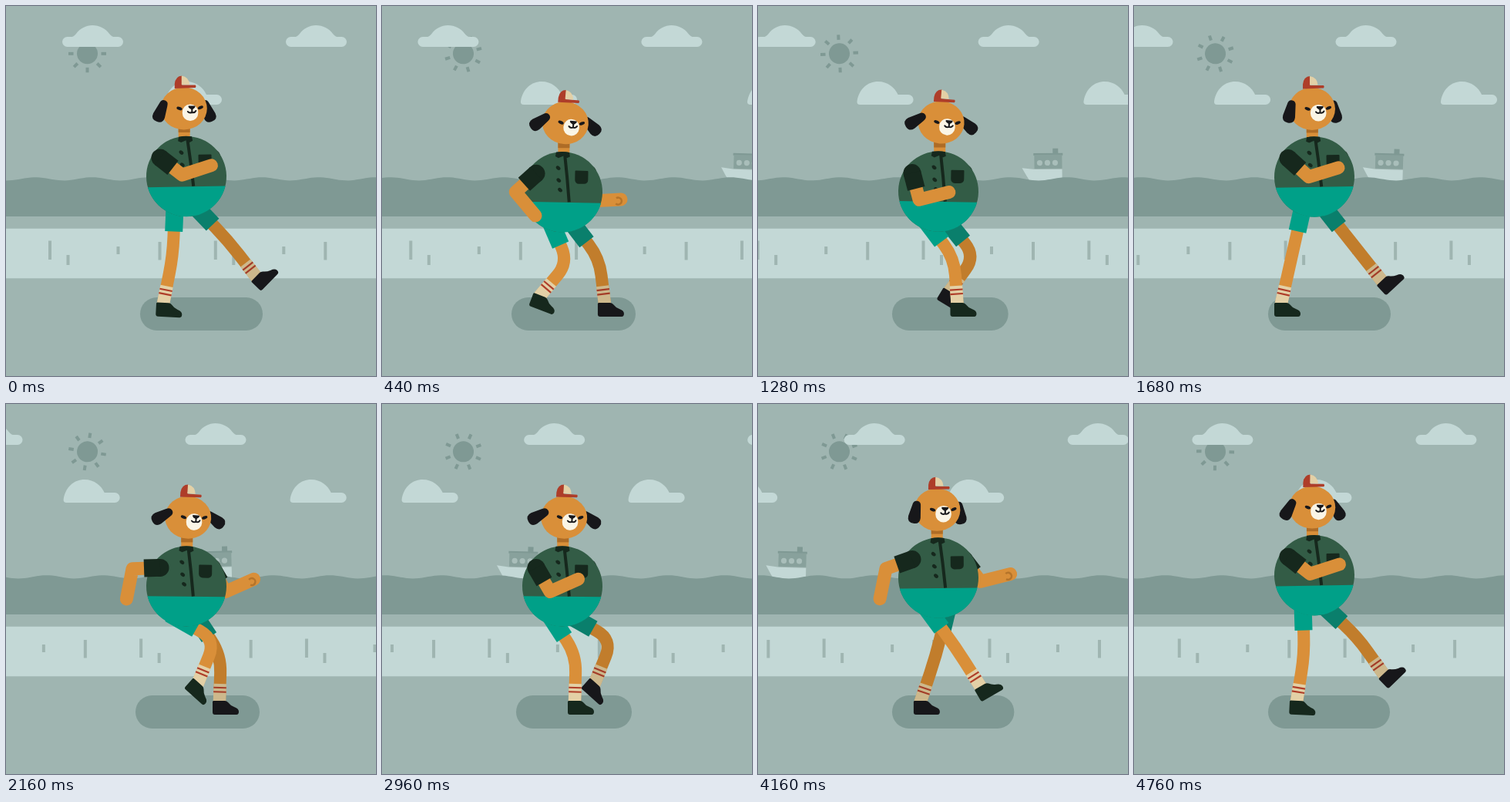
Recreate the animation shown at these times as an HTML page with a canvas. Size 480 by 480 pixels, loop 4.8 s.

```html
<!DOCTYPE html>
<html lang="en">
<head>
<meta charset="utf-8">
<title>Dog on a seaside walk</title>
<style>
html, body { margin: 0; width: 100%; height: 100%; overflow: hidden; background: #9fb5b1; }
canvas { display: block; width: 480px; height: 480px; }
</style>
</head>
<body>
<canvas id="stage" width="480" height="480"></canvas>
<script>
const ctx = document.getElementById('stage').getContext('2d');
const LOOP = 4800, STRIDE = 1600, TICK = 40, TAU = Math.PI * 2;
const C = {
  sky: '#9fb5b1', sea: '#7f9994', pale: '#c3d8d6', window: '#a9beba',
  skin: '#d98f39', shade: '#ae6c26', shirt: '#335c46', dark: '#16281d',
  pants: '#00a088', red: '#ae3d29', cream: '#e3d0a6', ink: '#17171a', white: '#faf5e6'
};
const NEAR = { skin: C.skin, pants: C.pants, sock: C.cream, stripe: C.red, shoe: C.dark };
const FAR = { skin: '#c17d2c', pants: '#0a7f6c', sock: '#cdb88c', stripe: '#a33c28', shoe: C.ink };
const rad = d => d * Math.PI / 180;

// Periodic monotone curve through [phase, value] keys.
function track(keys) {
  const n = keys.length;
  const at = i => {
    const k = Math.floor(i / n), [q, v] = keys[i - k * n];
    return [q + k * STRIDE, v];
  };
  const slope = i => {
    const [a, b] = [at(i), at(i + 1)];
    return (b[1] - a[1]) / (b[0] - a[0]);
  };
  const tangent = i => {
    const a = slope(i - 1), b = slope(i);
    return a * b <= 0 ? 0 : 2 * a * b / (a + b);
  };
  return phase => {
    const q = ((phase % STRIDE) + STRIDE) % STRIDE;
    let i = n - 1;
    while (i > 0 && keys[i][0] > q) i--;
    const [q0, v0] = at(i), [q1, v1] = at(i + 1);
    const h = q1 - q0, u = (q - q0) / h, w = 1 - u;
    return v0 * (1 + 2 * u) * w * w + tangent(i) * h * u * w * w
      + v1 * u * u * (3 - 2 * u) - tangent(i + 1) * h * u * u * w;
  };
}

const footX = track([[0, 204], [80, 191], [320, 176], [560, 249], [780, 298], [880, 295], [1120, 272], [1360, 250], [1560, 211]]);
const footY = track([[0, 386], [320, 386], [560, 362], [770, 351], [880, 357], [1120, 386]]);
const footTilt = track([[0, 3], [80, 0], [320, 0], [560, 42], [780, -46], [880, -43], [1120, 0], [1360, 0]]);
const kneeBend = track([[0, 5], [80, 0], [320, 15], [560, 40], [760, 6], [880, 0], [1120, 11], [1360, 18], [1560, 6]]);
const upperAngle = track([[0, 38], [80, 42], [320, 90], [560, 178], [720, 190], [880, 175], [1360, 60], [1560, 38]]);
const foreAngle = track([[0, -18], [80, -17], [320, 0], [560, 101], [720, 115], [880, 113], [1360, -24], [1560, -18]]);
const shadowLeft = track([[0, 174], [80, 174], [320, 168], [560, 168], [880, 174], [1360, 174]]);
const shadowRight = track([[0, 333], [80, 333], [320, 329], [560, 329], [880, 333], [1360, 324], [1560, 332]]);

function rect(color, x, y, w, h, r = 0) {
  ctx.fillStyle = color;
  ctx.beginPath();
  ctx.roundRect(x, y, w, h, r);
  ctx.fill();
}
function oval(color, x, y, rx, ry = rx, turn = 0) {
  ctx.fillStyle = color;
  ctx.beginPath();
  ctx.ellipse(x, y, rx, ry, rad(turn), 0, TAU);
  ctx.fill();
}
function shape(color, d) {
  ctx.fillStyle = color;
  ctx.fill(new Path2D(d));
}
function curve(color, width, d, cap = 'butt') {
  ctx.strokeStyle = color;
  ctx.lineWidth = width;
  ctx.lineCap = cap;
  ctx.lineJoin = 'round';
  ctx.stroke(new Path2D(d));
}
function line(color, width, points, cap) {
  curve(color, width, 'M' + points.map(p => `${p.x} ${p.y}`).join('L'), cap);
}
function place(x, y, turn, draw) {
  ctx.save();
  ctx.translate(x, y);
  ctx.rotate(rad(turn));
  draw();
  ctx.restore();
}
const P = (x, y) => ({ x, y });
const mix = (a, b, k) => P(a.x + (b.x - a.x) * k, a.y + (b.y - a.y) * k);
const toward = (a, b, d) => mix(a, b, d / Math.hypot(b.x - a.x, b.y - a.y));
const polar = (a, deg, d) => P(a.x + Math.cos(rad(deg)) * d, a.y + Math.sin(rad(deg)) * d);

function repeat(first, tile, t, draw) {
  let x = (first - tile * t / LOOP) % tile - tile;
  for (; x < 480; x += tile) place(x, 0, 0, draw);
}

function sun(t) {
  place(105.5, 61.8, -180 * t / LOOP, () => {
    oval(C.sea, 0, 0, 13.5);
    for (let i = 0; i < 8; i++) {
      rect(C.sea, -2, -24.5, 4, 6.5);
      ctx.rotate(TAU / 8);
    }
  });
}

function clouds(t) {
  repeat(73, 290, t, () => {
    rect(C.pale, 0, 40, 79, 13, 6.5);
    shape(C.pale, 'M10 41 Q15 40 18 36 C23 29 31 25 39 25 C48 25 56 29 61 36 Q64 40 69 41 Z');
  });
  repeat(207, 294, t, () =>
    shape(C.pale, 'M4 128 Q-1 128 0 123 C3 107 14 98 27 98 C40 98 49 106 53 115 H66.5 a6.5 6.5 0 0 1 0 13 Z'));
}

function boat(t) {
  const rock = 1.7 * Math.cos(TAU * (t - 450) / 1200);
  place(516.5 - 0.1155 * t, 224, rock, () => {
    rect(C.sea, 14, -39, 7, 8);
    rect(C.sea, -11, -33, 38, 3);
    rect('#88a19c', -10, -31, 36, 18);
    for (const x of [-3, 7, 17]) oval(C.window, x, -20.5, 3.6);
    shape(C.pale, 'M-26 -14 L-9 -12 H26 V6 H-14 Q-20 -3 -26 -14 Z');
  });
}

function shore(t) {
  const wave = 294 / 4, shift = 294 * t / LOOP;
  ctx.fillStyle = C.sea;
  ctx.beginPath();
  ctx.moveTo(0, 274);
  for (let x = 0; x <= 480; x += 4) ctx.lineTo(x, 224.3 - 2.1 * Math.cos(TAU * (x - 38 + shift) / wave));
  ctx.lineTo(480, 274);
  ctx.fill();
  rect(C.sky, 0, 273, 480, 207);
  rect(C.pale, 0, 288.7, 480, 64.6);
  repeat(55, 214.8, t, () => {
    rect(C.sky, 0, 304.5, 4, 24.5);
    rect(C.sky, 23.5, 323, 4, 13);
    rect(C.sky, 88.5, 312, 4, 10);
    rect(C.sky, 142.5, 306, 4, 23.5);
  });
}

function leg(q, dx, cy, tone) {
  const hip = P(219 + dx, cy + 39.5), ankle = P(footX(q) + dx, footY(q));
  const slant = Math.atan2(ankle.y - hip.y, ankle.x - hip.x) * 360 / TAU;
  const knee = polar(mix(hip, ankle, 0.5), slant - 90, kneeBend(q));
  const a = mix(hip, knee, 0.62), b = mix(knee, ankle, 0.38);
  curve(tone.skin, 16, `M${hip.x} ${hip.y} L${a.x} ${a.y} Q${knee.x} ${knee.y} ${b.x} ${b.y} L${ankle.x} ${ankle.y}`);

  const up = n => toward(ankle, knee, n);
  line(tone.sock, 16.5, [up(-2), up(23)]);
  for (const n of [12.5, 18]) line(tone.stripe, 16.5, [up(n - 1.1), up(n + 1.1)]);
  place(ankle.x, ankle.y, footTilt(q), () =>
    shape(tone.shoe, 'M-8 -1 H7 Q9 -1 11 1 Q14 5 19 7 Q25 9 25 13 Q25 17 22 17 H-6 Q-9 17 -9 14 V0 Z'));
  line(tone.pants, 23, [toward(hip, knee, -8), toward(hip, knee, 32)]);
}

function arm(q, dx, cy, far) {
  const shoulder = P(200 + dx, cy - 24);
  const elbow = polar(shoulder, upperAngle(q), 36);
  const hand = polar(elbow, foreAngle(q), 40);
  line(C.skin, 17, [shoulder, elbow, hand], 'round');
  if (far) {
    place(hand.x, hand.y, foreAngle(q), () =>
      curve('#b5742a', 2.5, 'M-6 -2 A4.5 4.5 0 1 1 -7 5'));
  }
  oval(C.dark, shoulder.x, shoulder.y, 11.5);
  line(C.dark, 23, [shoulder, polar(shoulder, upperAngle(q), 21)]);
}

function torso(cy, lift) {
  place(234, cy, -1.1 * lift, () => {
    oval(C.shirt, 0, 0, 52);
    ctx.fillStyle = C.pants;
    ctx.beginPath();
    ctx.arc(0, 0, 52.2, 0.26, Math.PI - 0.26);
    ctx.fill();
    curve(C.dark, 4, 'M2 -50 Q6 -20 9 13');
    oval(C.dark, -6, -31, 3.2, 2.3, 40);
    oval(C.dark, -5, -15, 3.2, 2.3, 40);
    oval(C.dark, -3, -2.5, 3.2, 2.3, 40);
    rect(C.dark, 16, -28, 17, 17, [1, 1, 5, 5]);
    shape(C.dark, 'M-9 -51.5 Q0 -53 8 -51.5 L9 -46 L5 -44 L1 -47 L-6 -44 L-10 -46 Z');
  });
}

function ear(x, turn) {
  place(x, -4, turn, () =>
    shape(C.ink, 'M-5.5 -1 Q-5 -7 0 -7 Q5 -7 5.5 -1 L8 14 Q8.5 22.5 0 22.5 Q-8.5 22.5 -8 14 Z'));
}

function head(p, lift) {
  const flap = 33 + 24 * Math.cos(TAU * (p - 540) / 800);
  place(234.3 - 3.6 * lift, 142.2 - 9.5 * lift, 2.5 - 2.6 * lift, () => {
    ear(28, -flap);
    oval(C.skin, 0, 0, 30, 27.5);
    ear(-27, flap);

    shape(C.red, 'M-12 -26 V-32 Q-11 -42 -2.5 -42.5 V-30.5 H15 Q16.5 -29 15 -27 Z');
    shape(C.cream, 'M-3 -42.5 Q6.5 -41 7.5 -31 H-3 Z');

    rect(C.white, -2, -5.5, 20.5, 21.5, 10);
    shape(C.ink, 'M6 -3.5 H14.5 Q15.5 -2 13.5 -0.5 L10.5 1.7 L7 -0.5 Q5 -2 6 -3.5 Z');
    curve(C.ink, 2, 'M10.5 0 V4.5 M5 4 Q7 6.5 10.5 5 Q14 6 15.5 3', 'round');
    oval(C.ink, -5.8, 0, 3.8, 2, 20);
    oval(C.ink, 21.5, -1.2, 3.8, 2, -25);
  });
}

function walker(t) {
  const p = t % STRIDE, q = p + STRIDE / 2;
  const lift = Math.cos(TAU * (p - 30) / 800);
  const cy = 231 - 10.3 * lift;
  const left = shadowLeft(p);
  rect(C.sea, left, 378, shadowRight(p) - left, 43, 21.5);
  arm(q, 67, cy, true);
  leg(q, 27, cy, FAR);
  leg(p, 0, cy, NEAR);
  rect(C.skin, 226 - 2.4 * lift, cy - 66, 15, 17);
  rect(C.shade, 226 - 2.4 * lift, cy - 66, 15, 9);
  torso(cy, lift);
  arm(p, 0, cy, false);
  head(p, lift);
}

function frame(now) {
  const t = Math.floor((now - start) / TICK) * TICK % LOOP;
  rect(C.sky, 0, 0, 480, 480);
  sun(t);
  clouds(t);
  boat(t);
  shore(t);
  walker(t);
  requestAnimationFrame(() => frame(performance.now()));
}
const start = performance.now();
frame(start);
</script>
</body>
</html>
```
